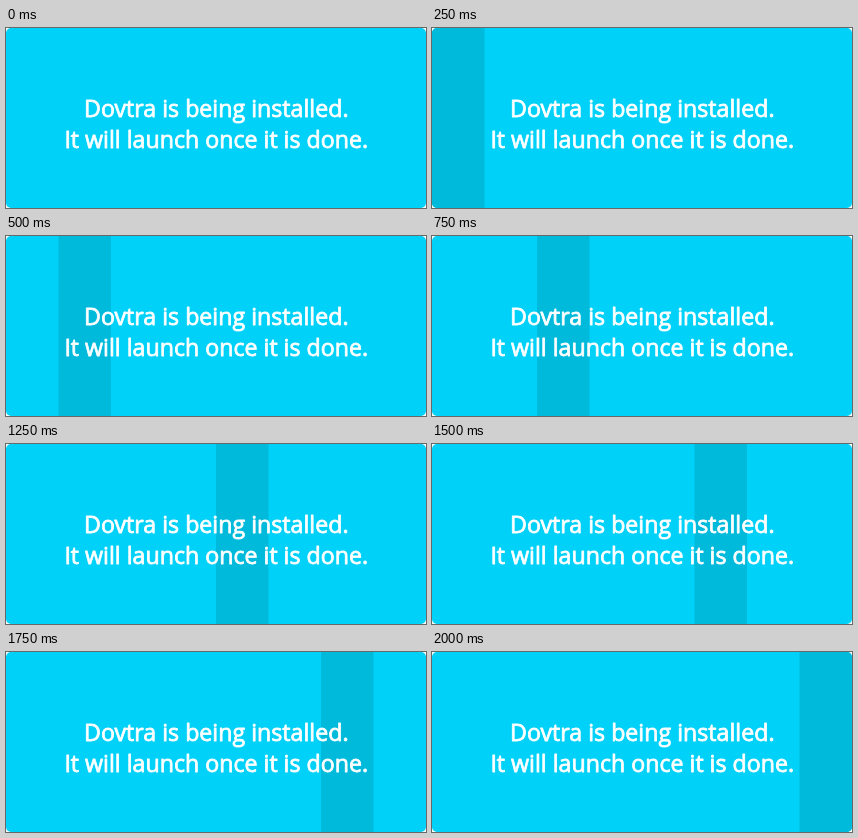
Recreate the animation shown at these times as an HTML page. Size 420 by 180 pixels, loop 2250 ms.

```html
<!DOCTYPE html>
<html lang="en">
<head>
<meta charset="utf-8">
<title>Installing</title>
<style>
  html, body { margin: 0; width: 100%; height: 100%; overflow: hidden; background: #fff; }
  svg { display: block; width: 420px; height: 180px; }
  text {
    font: 23.2px "Open Sans", "Noto Sans", sans-serif;
    text-anchor: middle;
    fill: #fff;
    stroke: #fff;
    stroke-width: .8px;
    stroke-linejoin: round;
  }
</style>
</head>
<body>
<svg viewBox="0 0 420 180">
  <clipPath id="card"><rect width="420" height="180" rx="5"/></clipPath>
  <g clip-path="url(#card)">
    <rect width="420" height="180" fill="#00d1f8"/>
    <rect id="bar" x="-52.5" width="52.5" height="180" fill="#00badc"/>
  </g>
  <text x="210.3" y="89">Dovtra is being installed.</text>
  <text x="210.3" y="120">It will launch once it is done.</text>
</svg>
<script>
  const STEP = 250, STEPS = 9, WIDTH = 52.5;
  const bar = document.getElementById("bar");
  const start = performance.now();

  // The bar waits off stage for one step, then jumps right by its own width.
  function draw() {
    const step = Math.floor((performance.now() - start) / STEP) % STEPS;
    bar.setAttribute("x", (step - 1) * WIDTH);
    requestAnimationFrame(draw);
  }
  draw();
</script>
</body>
</html>
```
